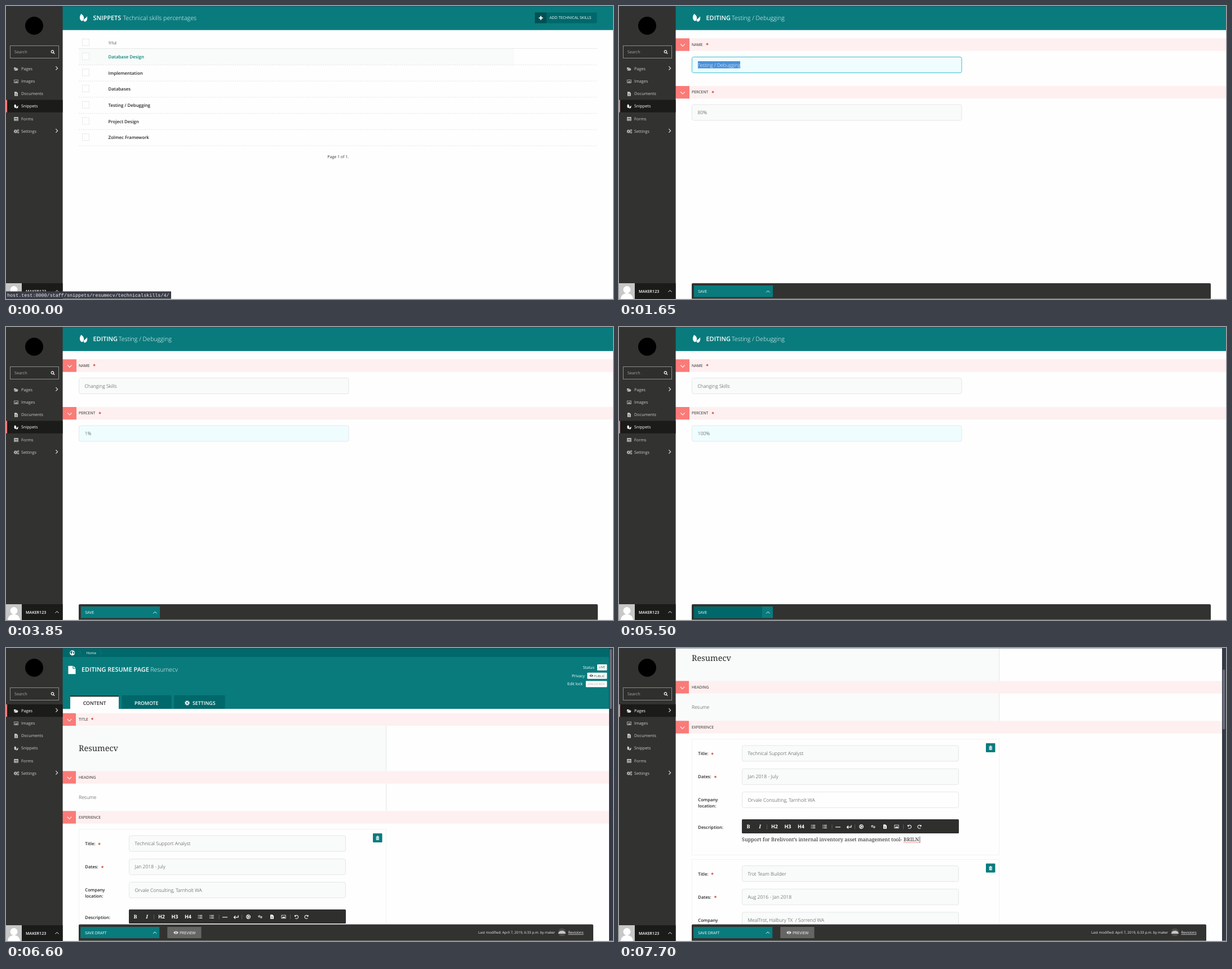
Write an HTML page that moves like this. It is 1077 by 520 pixels and loops after 8 s.

```html
<!DOCTYPE html>
<html lang="en">
<head>
<meta charset="utf-8">
<title>Editing skills</title>
<style>
  html, body { margin: 0; width: 100%; height: 100%; overflow: hidden; background: #fefefe; }
  svg { display: block; width: 1077px; height: 520px; font-family: 'Open Sans', sans-serif; text-rendering: geometricPrecision; }
  .serif { font-family: 'Noto Serif', serif; }
  .mono { font-family: 'Liberation Mono', monospace; }
</style>
</head>
<body>
<svg id="stage" viewBox="0 0 1077 520"></svg>
<script>
const TEAL = '#097b7d', DEEP = '#00686a', DARK = '#323231', INK = '#1b1b1a';
const SALMON = '#fa7b78', PINK = '#fef0f0', PALE = '#f9fbfa', EDGE = '#e4e7e7', BODY = '#3a3a3a';
const LEFT = 100, SIDE = 100.6;
const STEP = 550, LOOP = 8000;

// drawing helpers
const rect = (x, y, w, h, fill, more = '') =>
  `<rect x="${x}" y="${y}" width="${w}" height="${h}" fill="${fill}" ${more}/>`;
const text = (x, y, s, size, fill = '#333', weight = 400, more = '') =>
  `<text x="${x}" y="${y}" font-size="${size}" fill="${fill}" font-weight="${weight}" ${more}>${s}</text>`;
const line = (x1, y1, x2, y2, color, w = 1, more = '') =>
  `<path d="M${x1} ${y1}L${x2} ${y2}" stroke="${color}" stroke-width="${w}" fill="none" ${more}/>`;
const disc = (x, y, r, fill, more = '') => `<circle cx="${x}" cy="${y}" r="${r}" fill="${fill}" ${more}/>`;
const shift = (dy, s) => `<g transform="translate(0 ${dy})">${s}</g>`;
const place = (x, y, size, s) =>
  `<g transform="translate(${x - size / 2} ${y - size / 2}) scale(${size / 10})">${s}</g>`;
const icon = (x, y, size, name, fill = '#fff') =>
  place(x, y, size, `<path d="${ICONS[name]}" fill="${fill}" fill-rule="evenodd"/>`);
const stroked = (x, y, size, d, color = '#fff', w = 1.2) =>
  place(x, y, size, `<path d="${d}" fill="none" stroke="${color}" stroke-width="${w}"/>`);
const chevron = (x, y, size, turn, color = '#fff', w = 1.6) =>
  `<g transform="rotate(${turn} ${x} ${y})">${stroked(x, y, size, 'M0 2.5L5 7.5 10 2.5', color, w)}</g>`;

const ICONS = {
  leaf: 'M2 0C5 1.5 6.3 4.5 5 7.5 4.4 9 3 9.3 2 8.5-.5 6.5 0 2.5 2 0ZM9.5 3C10.3 6 9.5 9.6 6.6 9.8 4.9 9.8 4.8 8 5.8 6.8 7 5.3 8.6 5 9.5 3Z',
  folder: 'M0 1.5H3.5L4.5 3H8V4.2H2.4L0 8ZM2.8 5H10L8 9H.6Z',
  image: 'M0 1H10V9H0ZM1 2V8H9V2ZM1.6 7.5L4 4.5 5.5 6 7 4 8.5 7.5Z',
  doc: 'M1 0H6L9 3V10H1ZM3 4.6V5.6H7V4.6ZM3 7V8H7V7Z',
  page: 'M.5 0H6V3.5H9.5V10H.5ZM6.8 0L9.5 2.7H6.8Z',
  form: 'M0 .5H10V9.5H0ZM1.6 3V4.2H8.4V3ZM1.6 5.2V6.2H4V5.2ZM5 5.2V6.2H8.4V5.2ZM1.6 7.2V8.2H4V7.2ZM5 7.2V8.2H8.4V7.2Z',
  eye: 'M0 5C2.5 1 7.5 1 10 5 7.5 9 2.5 9 0 5ZM5 2.8A2.2 2.2 0 1 0 5.01 2.8ZM5 4A1 1 0 1 1 4.99 4Z',
  plus: 'M3.6 0H6.4V3.6H10V6.4H6.4V10H3.6V6.4H0V3.6H3.6Z',
  bin: 'M1 1.5H3.5V.3H6.5V1.5H9V2.6H1ZM1.6 3.4H8.4V10H1.6ZM3 4.6V8.8H4V4.6ZM6 4.6V8.8H7V4.6Z',
  list: 'M0 1H2V2.4H0ZM3.2 1H10V2.4H3.2ZM0 4.3H2V5.7H0ZM3.2 4.3H10V5.7H3.2ZM0 7.6H2V9H0ZM3.2 7.6H10V9H3.2Z',
  globe: 'M5 0A5 5 0 1 1 4.99 0ZM2 2L5 1.6 5.4 3.6 3.6 4.8 4.4 6.8 3.4 8.4 2.6 6 1 4.4ZM6.6 3L8.6 3.4 9 5.6 7.6 7.4 6.4 5Z'
};
const gear = (x, y, r, fill, hole) =>
  disc(x, y, r * .7, fill) +
  disc(x, y, r * .8, 'none', `stroke="${fill}" stroke-width="${r * .4}" stroke-dasharray="${r * .314}"`) +
  disc(x, y, r * .32, hole);

const star = (x, y) => text(x, y + 1.3, '*', 8.5, '#d0342c', 700);
const input = (x, y, w, s, focus = {}) =>
  rect(x + .5, y + .5, w - 1, 28, focus.fill || PALE, `rx="3" stroke="${focus.edge || EDGE}"`) +
  text(x + 10.5, y + 17.6, s, 8.65, BODY, 300);
const caret = (x, y, h) => line(x, y, x, y + h, '#222', .7);

// sidebar
const MENU = ['Pages', 'Images', 'Documents', 'Snippets', 'Forms', 'Settings'];
const MENU_ICONS = ['folder', 'image', 'doc', 'leaf', 'form'];

function sidebar(active) {
  let s = rect(0, 0, SIDE, 520, DARK) + disc(50, 35, 16, '#000');
  s += rect(7.5, 70.5, 86, 22, '#2f2f2e', 'stroke="#8c8c8a"') + text(15, 84, 'Search', 7.2, '#a8a8a6');
  s += stroked(83, 81.7, 7, 'M4.2 1A3.2 3.2 0 1 0 4.21 1M6.6 6.6L9.6 9.6', '#fff', 1.7);
  MENU.forEach((name, i) => {
    const y = 111.2 + 22.2 * i, on = i === active, color = on ? '#fff' : '#cbcbc9';
    if (on) s += rect(0, y - 11.2, SIDE, 22.2, INK) + rect(0, y - 11.2, 2, 22.2, SALMON);
    s += MENU_ICONS[i] ? icon(18, y + .3, 7.5, MENU_ICONS[i], color)
      : gear(17, y + .3, 3.3, color, DARK) + gear(21.5, y - 1.7, 1.8, color, DARK) + gear(21.5, y + 2.3, 1.8, color, DARK);
    s += text(27, y + 2.6, name, 7.29, color);
    if (i === 0 || i === 5) s += chevron(90, y - .8, 6.5, -90, '#e8e8e6', 1.7);
  });
  s += rect(0, 492, 28, 28, '#c7c7c7') + disc(14, 503.5, 6.5, '#fff');
  s += '<path d="M3 520C4 512 9 510 14 510S24 512 25 520Z" fill="#fff"/>';
  s += rect(28, 492, SIDE - 28, 28, INK) + text(35, 508.7, 'MAKER123', 7.05, '#fff', 600);
  return s + chevron(90.5, 506, 6, 180);
}

const titles = (bold, light, y, x1, x2) =>
  text(x1, y, bold, 10.94, '#fff', 600) + text(x2, y, light, 10.65, '#fff', 300);
const heading = (bold, light, x) =>
  rect(LEFT, 0, 977, 42.7, TEAL) + icon(137.5, 21, 14, 'leaf') + titles(bold, light, 24.6, 154.5, x);

// list of skills
function listing(names, hover) {
  let s = heading('SNIPPETS', 'Technical skills percentages', 207.5);
  s += rect(938.5, 11.5, 110, 19, DEEP) + rect(938.5, 11.5, 20.5, 19, '#005053') + icon(949, 21.3, 7, 'plus');
  s += text(964.3, 23.4, 'ADD TECHNICAL SKILLS', 6.8, '#fff');
  const box = y => rect(135.5, y - 6, 12, 12, '#fefefe', `stroke="#e6e8e8" stroke-width=".9"`);
  s += box(64.5) + text(181.5, 68, 'TITLE', 6.1) + line(129, 75.5, 1049, 75.5, '#e8e8e8');
  names.forEach((name, i) => {
    const y = 90 + 28.7 * i, on = i === hover;
    if (on) s += rect(129, y - 14, 772.5, 28, '#f8fbfa');
    s += box(y - .8) + text(181.5, y + 2.9, name, 7.85, on ? '#0a7f75' : '#262626', 600);
    s += line(129, y + 14.5, 1049, y + 14.5, '#e2e2e2', .9, 'stroke-dasharray="2.2 1.7"');
  });
  return s + text(570.3, 270.3, 'Page 1 of 1.', 7);
}

const SKILLS = ['Database Design', 'Implementation', 'Databases', 'Testing / Debugging', 'Project Design', 'Zolmec Framework'];
const SAVED = SKILLS.map((s, i) => i === 3 ? 'Changing Skills' : s);

const hovering = (row, id) => listing(SKILLS, row) + sidebar(3) +
  rect(0, 506.5, 293, 13.5, '#3a3d47') +
  text(2, 516, `host.test:8000/staff/snippets/resumecv/technicalskills/${id}/`, 8.42, '#f2f2f2', 400, 'class="mono"');

function updated() {
  let s = shift(36.5, listing(SAVED, -1)) + rect(LEFT, 0, 977, 37, '#0d9270');
  s += disc(117.5, 18.8, 5, '#fff') + stroked(117.5, 18.8, 6, 'M1.5 5L4 7.5 8.5 2.5', '#0d9270', 1.8);
  s += text(128, 21, "Technical skills percentages 'Changing Skills' updated.", 7.14, '#fff');
  s += rect(314.5, 12.5, 25.5, 13, 'none', 'rx="1.5" stroke="#9dd3c4" stroke-width=".9"') + text(320, 21, 'EDIT', 6.8, '#fff');
  return s + sidebar(3);
}

// skill form
const band = (y, label, right, edge, starX) =>
  rect(LEFT, y, right - LEFT, 22.3, PINK) + rect(LEFT, y, edge - LEFT, 22.3, SALMON) +
  chevron((101 + edge) / 2, y + 12.2, 7.5, 0, '#fff', 1.4) +
  text(129, y + 13.4, label, 6.9, '#262626') + (starX ? star(starX, y + 13.4) : '');

const FOCUS = { fill: '#effdff', edge: '#3fbccb' }, TINT = { fill: '#effdff' };

function form({ name = 'Changing Skills', percent = '80%', nameBox, percentBox, selected, carets = '', save }) {
  let s = heading('EDITING', 'Testing / Debugging', 200);
  s += band(57.4, 'NAME', 1077, 125, 154.3) + input(129, 90, 479.5, name, nameBox);
  if (selected) s += rect(140, 98, 75, 12.6, '#4a90d9') + text(139.5, 107.6, name, 8.65, '#fff', 300);
  s += band(142, 'PERCENT', 1077, 125, 164.2) + input(129, 174.5, 479.5, percent, percentBox) + carets;
  s += rect(129, 492, 921, 30, DARK, 'rx="2"') + rect(133, 496, 140, 20.5, TEAL);
  if (save) s += rect(133, 496, 121, 20.5, DEEP);
  s += text(140.3, 509, 'SAVE', 6.9, '#fff') + chevron(264.3, 506.8, 6, 180);
  return s + sidebar(3);
}

// long page
const JOBS = [
  ['Technical Support Analyst', 'Jan 2018 - July', 'Orvale Consulting, Tarnholt WA'],
  ['Trot Team Builder', 'Aug 2016 - Jan 2018', 'MealTrot, Halbury TX&#160; / Sorrend WA']
];

function toolbar() {
  const y = 477, mark = (x, s, more = '') => text(x, y + 3.3, s, 9, '#fff', 700, `text-anchor="middle" ${more}`);
  let s = rect(218, 464, 385, 25, '#2f2f2e', 'rx="1.5"');
  s += mark(229.5, 'B', 'class="serif"') + mark(250, 'I', 'class="serif" font-style="italic"');
  s += mark(276, 'H2') + mark(299.5, 'H3') + mark(323, 'H4');
  s += icon(344.5, y, 7.5, 'list') + icon(365, y, 7.5, 'list');
  s += line(384, y + .8, 393, y + .8, '#fff', 1.1) + stroked(408, y, 9, 'M9.5 2V6H1M4 3L1 6 4 9', '#fff', 1.3);
  s += stroked(430, y, 8, 'M5 .8A4.2 4.2 0 1 0 5.01 .8M4 3L7 5 4 7Z', '#fff', 1.5);
  s += stroked(451, y, 7.5, 'M5.5 4.5L3.5 2.5A1.7 1.7 0 0 0 1.2 4.8L3 6.5M4.5 5.5L6.5 7.5A1.7 1.7 0 0 0 8.8 5.2L7 3.5', '#fff', 1.4);
  s += icon(472, y, 7.5, 'doc') + icon(492.5, y, 8, 'image');
  s += stroked(515.5, y, 7.5, 'M1 1V4H4M1.3 4A4 4 0 1 1 2 8', '#fff', 1.4);
  s += stroked(533, y, 7.5, 'M9 1V4H6M8.7 4A4 4 0 1 0 8 8', '#fff', 1.4);
  return s + [262.5, 378, 418.5, 504.5].map(x => line(x, 473, x, 481.5, '#666', .8)).join('');
}

function job([title, dates, place], white) {
  const label = (y, s) => text(140.3, y, s, 7.7, '#262626', 600);
  return rect(129.5, 321.8, 545, 205.5, 'none', 'stroke="#f1f2f2"') +
    rect(651, 329, 16.5, 16, TEAL, 'rx="1"') + icon(659.3, 337, 7.5, 'bin') +
    label(350.3, 'Title:') + star(163.2, 350.3) + input(218, 332.5, 385, title) +
    label(391.4, 'Dates:') + star(168.8, 391.4) + input(218, 373.8, 385, dates) +
    label(432.4, 'Company') + label(442.8, 'location:') +
    input(218, 415, 385, place, white ? { fill: '#fefefe' } : {}) +
    label(481.2, 'Description:') + toolbar();
}

function pageTop() {
  let s = rect(LEFT, 0, 970, 108, TEAL) + rect(LEFT, 0, 970, 16, DEEP) + icon(117.7, 8.7, 9, 'globe');
  s += chevron(131, 8.5, 8, -90, '#1d8385', 1) + chevron(168, 8.5, 8, -90, '#1d8385', 1);
  s += text(142.5, 10.8, 'Home', 6.2, '#fff') + icon(117, 39, 14.5, 'page');
  s += titles('EDITING RESUME PAGE', 'Resumecv', 42.2, 134, 256.3);
  const right = (x, y, t) => text(x, y, t, 7, '#fff', 400, 'text-anchor="end"');
  const tag = (x, y, w, h) => rect(x, y, w, h, '#fefefe', 'rx="1"');
  s += right(1044, 36.5, 'Status') + tag(1049, 29, 17.3, 10.7) + text(1051.8, 36.4, 'LIVE', 5.7, '#444');
  s += right(1027, 51.7, 'Privacy') + tag(1031.3, 43.8, 35, 11) + icon(1038.6, 49.3, 6.5, 'eye', '#333') + text(1043.3, 51.5, 'PUBLIC', 5.7, '#444');
  s += right(1023.3, 66.4, 'Edit lock') + tag(1028.8, 58.6, 37.5, 11) + text(1031.5, 66.3, 'UNLOCKED', 5.9, '#b0b0b0');
  s += rect(114, 84, 86, 24.5, '#fefefe') + rect(114, 84, 86, 2.5, '#2d3b3b');
  s += rect(205.5, 84, 88, 24, DEEP) + rect(298.3, 84, 90.2, 24, DEEP) + gear(321.5, 97.6, 4.4, '#fff', DEEP);
  const tab = (x, t, c) => text(x, 100.5, t, 8.75, c, 600);
  return s + tab(136.7, 'CONTENT', '#262626') + tab(228, 'PROMOTE', '#fff') + tab(331, 'SETTINGS', '#fff');
}

function pageBar() {
  let s = rect(129, 490.6, 913, 30, DARK, 'rx="2"') + rect(132.3, 495, 140, 20, TEAL);
  s += text(140.3, 507.6, 'SAVE DRAFT', 6.85, '#fff') + chevron(264, 505.3, 6, 180);
  s += rect(286.3, 495, 60.2, 20, '#656564') + icon(301.5, 505, 8.5, 'eye') + text(308, 507.5, 'PREVIEW', 6.85, '#fff');
  s += text(838, 507.4, 'Last modified: April 7, 2019, 6:33 p.m. by maker', 6.2, '#f0f0f0');
  s += disc(986.4, 504.5, 7, '#4b4a48') + '<path d="M979.6 507A7 7 0 0 1 993.2 507Z" fill="#c9c6c2"/>';
  return s + text(997.5, 507.4, 'Revisions', 6.25, '#fff', 400, 'text-decoration="underline"');
}

function page(scroll, typing) {
  let s = pageTop() + band(115.7, 'TITLE', 1070, 124, 150.8);
  s += rect(LEFT, 138, 574.5, 80.5, PALE) + text(129, 183.3, 'Resumecv', 14.5, '#262626', 400, 'class="serif"');
  s += band(218.5, 'HEADING', 1070, 124);
  s += rect(LEFT, 240.8, 574.5, 48.5, typing ? PALE : '#fefefe') + text(129, 268, 'Resume', 8.65, BODY, 300);
  s += line(674.5, 138, 674.5, 218.5, EDGE) + line(674.5, 240.8, 674.5, 289.3, EDGE);
  s += band(289.3, 'EXPERIENCE', 1070, 124) + job(JOBS[0], typing) + shift(213.5, job(JOBS[1]));
  const serif = (x, t) => text(x, 503.2, t, 9.05, '#262626', 400, 'class="serif"');
  s += serif(218, 'Support for Brelivont’s internal inventory asset management tool-') + serif(504.8, 'BRILN');
  s += line(505, 505.3, 533, 505.3, '#e0413a', .9, 'stroke-dasharray="1.2 .8"');
  if (typing) s += caret(533.8, 494.5, 11.5);
  return shift(-scroll, s) + pageBar() +
    rect(1070, 0, 7, 520, '#363a46') + rect(1071, 2 + scroll * .226, 4.2, 106, '#6a6d78', 'rx="1.5"') + sidebar(0);
}

// one entry per step
const scenes = [
  hovering(0, 4),
  hovering(1, 5),
  hovering(3, 7),
  form({ name: 'Testing / Debugging', nameBox: FOCUS, selected: true }),
  form({ nameBox: FOCUS, carets: caret(196.3, 98.5, 12) }),
  form({ percentBox: TINT }),
  form({ percent: '%', percentBox: TINT }),
  form({ percent: '1%', percentBox: TINT }),
  form({ percent: '10%', percentBox: FOCUS }),
  form({ percent: '100%', percentBox: FOCUS, carets: caret(154.2, 183, 12.5) }),
  form({ percent: '100%', percentBox: TINT, save: true }),
  updated(),
  page(0, false),
  page(80, false),
  page(160, true)
];
const rim = rect(0, 0, 1077, 1, '#2b3b4a', 'opacity=".5"') + rect(SIDE, 519.3, 977, .7, '#d8d8d8', 'opacity=".6"');

const stage = document.getElementById('stage');
const start = performance.now();
let shown = -1;
function draw() {
  const i = Math.min(scenes.length - 1, Math.floor(((performance.now() - start) % LOOP) / STEP));
  if (i !== shown) stage.innerHTML = rect(0, 0, 1077, 520, '#fefefe') + scenes[shown = i] + rim;
  requestAnimationFrame(draw);
}
draw();
</script>
</body>
</html>
```
